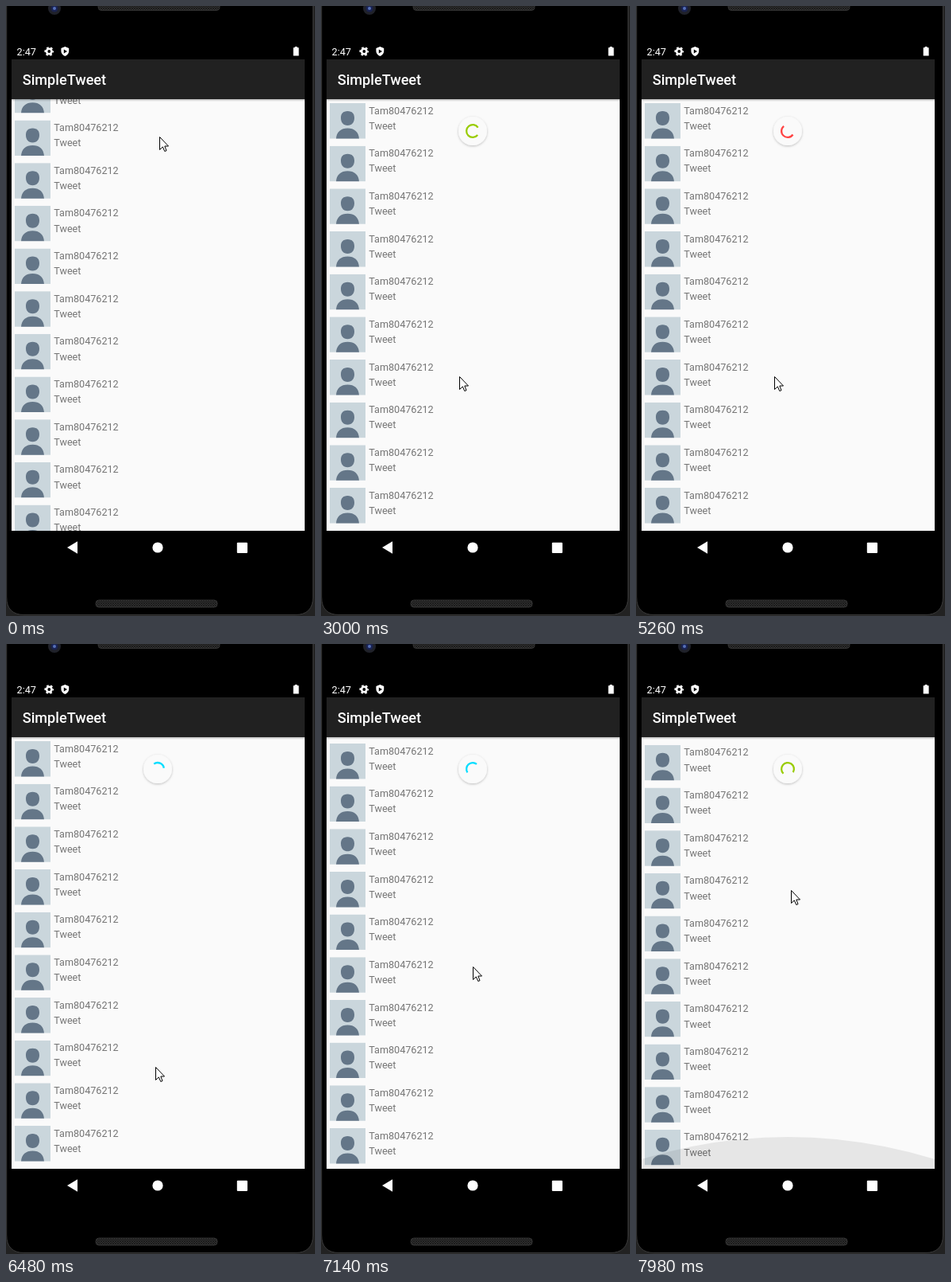
Write an HTML page that moves like this. It is 389 px wide and 766 px high and loops after 8 s.

```html
<!DOCTYPE html>
<html lang="en">
<head>
<meta charset="utf-8">
<title>Pull to refresh</title>
<style>
  html, body { margin: 0; width: 100%; height: 100%; overflow: hidden; background: #000; }
  svg { display: block; width: 389px; height: 766px; }
  text { font-family: Roboto, "Liberation Sans", sans-serif; }
  .row text { font-size: 12.6px; fill: #757575; }
</style>
</head>
<body>
<svg viewBox="0 0 389 766">
  <defs>
    <clipPath id="content"><rect x="7" y="117" width="369" height="542"/></clipPath>
    <clipPath id="avatarBox"><rect width="45" height="44.5"/></clipPath>
    <linearGradient id="barShadow" x2="0" y2="1">
      <stop offset="0" stop-color="#000" stop-opacity=".25"/>
      <stop offset="1" stop-color="#000" stop-opacity="0"/>
    </linearGradient>
    <pattern id="mesh" width="3" height="3" patternUnits="userSpaceOnUse">
      <rect width="3" height="3" fill="#303030"/>
      <path d="M0 0L3 3M3 0L0 3" stroke="#141414" stroke-width=".7"/>
    </pattern>
    <filter id="drop" x="-40%" y="-40%" width="180%" height="180%">
      <feDropShadow dx="0" dy="1" stdDeviation="1.5" flood-opacity=".25"/>
    </filter>
    <g id="row" class="row">
      <g transform="translate(11 122)" clip-path="url(#avatarBox)">
        <rect width="45" height="45" fill="#cad6dc"/>
        <path d="M22.5 10C28.5 10 31 13.5 31 18.5C31 24 28 28 22.5 28S14 24 14 18.5C14 13.5 16.5 10 22.5 10ZM8 45C8.5 36 14 31.5 22.5 31.5S36.5 36 37 45Z" fill="#647688"/>
      </g>
      <text x="60.3" y="135.6">Tam80476212</text>
      <text x="60.3" y="154.8">Tweet</text>
    </g>
  </defs>

  <!-- phone body -->
  <rect width="389" height="766" fill="#222"/>
  <path d="M.7 -2V742Q.7 764.5 23 764.5H364Q386.5 764.5 386.5 742V-2Z" fill="#000" stroke="#3a3a3a"/>
  <rect x="116" y="-4" width="153" height="9.5" rx="4" fill="url(#mesh)" stroke="#3a3a3a" stroke-width=".8"/>
  <rect x="113" y="746" width="153" height="9" rx="4" fill="url(#mesh)" stroke="#3a3a3a" stroke-width=".8"/>
  <circle cx="61" cy="3" r="8" fill="#20222a"/>
  <circle cx="61" cy="3" r="4.5" fill="#1a2350"/>
  <circle cx="61" cy="3" r="2" fill="#5570b8"/>

  <!-- status bar -->
  <g fill="#fff">
    <text x="13.5" y="61.5" font-size="12.7">2:47</text>
    <circle cx="54.3" cy="57" r="3.2" fill="none" stroke="#fff" stroke-width="2.6"/>
    <circle cx="54.3" cy="57" r="5" fill="none" stroke="#fff" stroke-width="1.8" stroke-dasharray="2.6 2.636" stroke-dashoffset="1.3"/>
    <path d="M74.3 51L79.2 53V56.8C79.2 59.8 77 62 74.3 63C71.6 62 69.4 59.8 69.4 56.8V53Z"/>
    <path d="M72.8 54.5V59.5L77 57Z" fill="#000"/>
    <path d="M361.7 52.3H363.6V51H366.6V52.3H368.6V62.5H361.7Z"/>
  </g>

  <rect x="7" y="67" width="369" height="50" fill="#212121"/>
  <text x="20.8" y="99.3" font-size="18.1" font-weight="500" fill="#fff">SimpleTweet</text>

  <g clip-path="url(#content)">
    <rect x="7" y="117" width="369" height="542" fill="#fafafa"/>
    <g id="list"></g>
    <circle id="glow" cx="191.5" cy="1241" r="622" fill="#000" opacity=".08"/>
    <rect x="7" y="117" width="369" height="3" fill="url(#barShadow)"/>
    <g id="spinner">
      <circle r="18" fill="#fafafa" filter="url(#drop)"/>
      <path id="arc" fill="none" stroke-width="2.3"/>
      <path id="arrow" d="M-4.4 0H4.4L0 4.6Z"/>
    </g>
  </g>

  <!-- navigation bar -->
  <g fill="#fff">
    <path d="M77 680L90 672.3V687.7Z"/>
    <circle cx="191" cy="680" r="6.6"/>
    <rect x="290.8" y="673.8" width="13.2" height="13.2" rx="1"/>
  </g>

  <path id="cursor" d="M.5 .5V16.5L4.3 12.9L6.8 18.5L9 17.6L6.8 12H11.5Z" fill="#fff" stroke="#000"/>
</svg>
<script>
const LOOP = 8000, ROW_PITCH = 53.67;
const ARC_RADIUS = 7.9, REST_Y = 157, PULLED_Y = 214;
const TOP_REACHED = 400, RELEASE = 1500, SPIN_START = 1700, CYCLE = 1300;
const FIRST_CYCLE = 2378, SECOND_DRAG = 6480, GLOW_START = 7980;
const COLORS = [[0, 221, 255], [153, 204, 0], [255, 187, 51], [255, 68, 68]];

const $ = id => document.getElementById(id);
const clamp = v => Math.min(1, Math.max(0, v));
const mix = (a, b, u) => a + (b - a) * u;
const ramp = (t, from, to) => clamp((t - from) / (to - from));
const easeOut = (u, power) => 1 - (1 - u) ** power;
const show = (id, visible) => { $(id).style.display = visible ? "" : "none"; };

// cubic-bezier(.4, 0, .2, 1), solved by bisection
function fastOutSlowIn(x) {
  x = clamp(x);
  let lo = 0, hi = 1;
  for (let i = 0; i < 24; i++) {
    const s = (lo + hi) / 2, r = 1 - s;
    if (1.2 * r * r * s + .6 * r * s * s + s ** 3 < x) lo = s; else hi = s;
  }
  return lo * lo * (3 - 2 * lo);
}

// Nudge up, pull down, drift lower, then drag back up
function cursorAt(t) {
  const pull = easeOut(ramp(t, 250, 1070), 1.7);
  const drift = ramp(t, 5600, 6330);
  const lift = ramp(t, SECOND_DRAG, GLOW_START);
  return {
    x: 193 - 19 * pull + 14 * drift + 7 * lift,
    y: 164 - 10 * ramp(t, 0, 120) + 311 * pull + 74 * drift
      - 8 * ramp(t, 6330, SECOND_DRAG) - 222 * easeOut(lift, 1.45)
  };
}

// Arc start and sweep in degrees, with its colour
function ringAt(t, pulledY) {
  const cycle = 1 + (t - FIRST_CYCLE) / CYCLE;
  if (cycle < 1) {
    const u = ramp(t, SPIN_START, FIRST_CYCLE);
    const sweep = mix(288, 3.6, u);
    const end = mix(145, 263, u) - (PULLED_Y - pulledY) * 2.5;
    return { start: end - sweep, sweep, color: COLORS[0], arrow: true };
  }
  const n = Math.floor(cycle), p = cycle - n;
  const head = fastOutSlowIn(2 * p), tail = fastOutSlowIn(2 * p - 1);
  const next = COLORS[(n + 1) % 4], fade = ramp(p, .75, 1);
  return {
    start: 360 * (.79 + .79 * tail + .21 * p) + 216 * (p + n - 1) - 25,
    sweep: 360 * (.01 + .79 * (head - tail)),
    color: COLORS[n % 4].map((c, i) => Math.round(mix(c, next[i], fade))),
    arrow: false
  };
}

function arcPath(start, sweep) {
  const point = deg => {
    const a = deg * Math.PI / 180;
    return `${ARC_RADIUS * Math.cos(a)} ${ARC_RADIUS * Math.sin(a)}`;
  };
  return `M${point(start)}A${ARC_RADIUS} ${ARC_RADIUS} 0 ${+(sweep > 180)} 1 ${point(start + sweep)}`;
}

function drawSpinner(t, cursorY) {
  const pulledY = Math.min(PULLED_Y, PULLED_Y + .55 * (cursorY - 416));
  const y = mix(pulledY, REST_Y, easeOut(ramp(t, RELEASE, SPIN_START), 4));
  const { start, sweep, color, arrow } = ringAt(t, pulledY);
  const paint = `rgb(${color})`;
  $("spinner").setAttribute("transform", `translate(191 ${y})`);
  $("arc").setAttribute("d", arcPath(start, sweep));
  $("arc").setAttribute("stroke", paint);
  $("arrow").setAttribute("fill", paint);
  $("arrow").setAttribute("transform", `rotate(${start + sweep}) translate(${ARC_RADIUS} 0)`);
  show("arrow", arrow);
  show("spinner", t >= TOP_REACHED);
}

function draw(t) {
  const { x, y } = cursorAt(t);
  const stretch = t > SECOND_DRAG ? Math.min(4.8, (531 - y) * .023) : 0;
  const scroll = t < TOP_REACHED ? -32.2 : stretch;
  $("list").setAttribute("transform", `translate(0 ${scroll})`);
  $("cursor").setAttribute("transform", `translate(${Math.round(x)} ${Math.round(y)})`);
  show("glow", t >= GLOW_START);
  drawSpinner(t, y);
}

$("list").innerHTML = Array.from({ length: 12 }, (_, i) =>
  `<use href="#row" y="${i * ROW_PITCH}"/>`).join("");

function frame() {
  draw(performance.now() % LOOP);
  requestAnimationFrame(frame);
}
frame();
</script>
</body>
</html>
```
